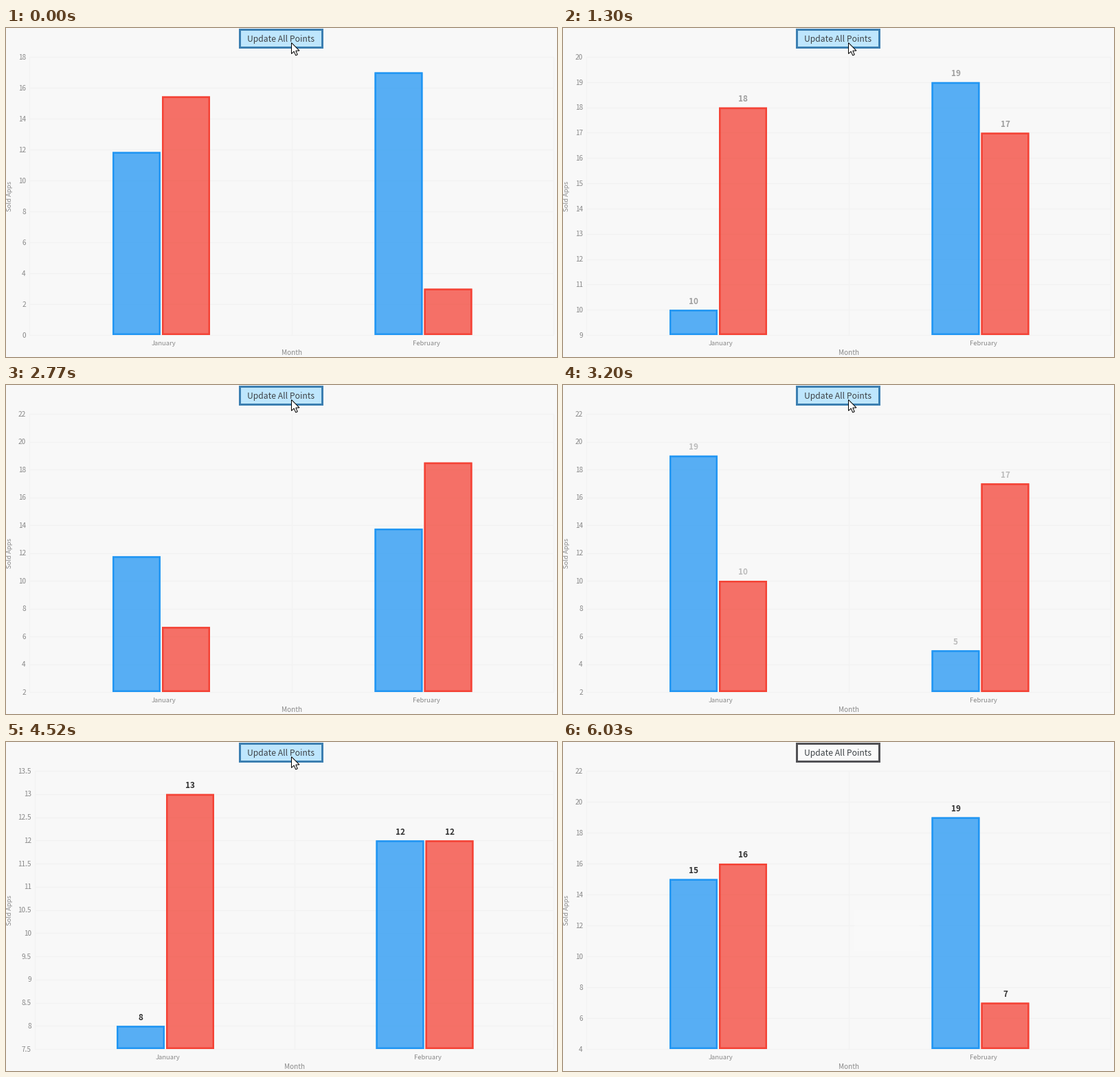
These frames come from a looping animation (802 px wide and 479 px high, 6250 ms). A matplotlib script:

```python
import numpy as np
import matplotlib.pyplot as plt
from matplotlib.animation import FuncAnimation
from matplotlib.collections import LineCollection
from matplotlib.patches import Polygon, Rectangle

W, H, DPI = 802, 479, 64
LOOP, STEP = 6250, 25
PX = 72 / DPI                      # points per pixel
TOP, BASE, RIGHT = 42, 447, 797
BAR_W, GAP = 70, 72
BLUE, RED = "#2196f3", "#f44336"

GROW = 300                         # bar animation, linear
FADE_DELAY, FADE = 450, 400        # value labels
LAG = 16                           # axis changes just before the bars move

# time of update, axis low, high, step, plot left, values (Jan, Feb pairs)
STATES = [
    (-271, 0, 18, 2, 34, (12, 16, 17, 3)),
    (670, 9, 20, 1, 34, (10, 18, 19, 17)),
    (1614, 2, 18, 2, 34, (6, 4, 16, 16)),
    (2630, 2, 22, 2, 34, (19, 10, 5, 17)),
    (3650, 7.5, 13.5, 0.5, 42, (8, 13, 12, 12)),
    (4640, 4, 22, 2, 34, (15, 16, 19, 7)),
]
FIRST_TOPS = np.array([212, 212, 64.5, 379.5])

HOVER_END = 4920
BUTTON = {
    "hover": ("#bee6fd", "#3c7fb1"),
    "pressed": ("#c4e5f6", "#2c628b"),
    "normal": ("#fafafa", "#515155"),
}

plt.rcParams["font.family"] = ["Noto Sans CJK JP", "DejaVu Sans"]
fig = plt.figure(figsize=(W / DPI, H / DPI), dpi=DPI, facecolor="#f8f8f8")
ax = fig.add_axes([0, 0, 1, 1])
ax.set_xlim(0, W)
ax.set_ylim(H, 0)
ax.axis("off")


def text(x, y, s="", size=10, color="#8a8a8a", **kw):
    kw = {"ha": "center", "va": "baseline", **kw}
    return ax.text(x, y, s, fontsize=size * PX, color=color, **kw)


def box(x, y, w, h, **kw):
    return ax.add_patch(Rectangle((x, y), w, h, snap=False, **kw))


def tops(state):
    _, lo, hi, _, _, values = state
    return BASE - (BASE - TOP) * (np.array(values) - lo) / (hi - lo)


grid = ax.add_collection(
    LineCollection([], colors="#f2f2f2", linewidths=1.2 * PX, zorder=1))
ticks = [text(0, 0, ha="right") for _ in range(13)]
months = [text(0, 462.3, name, 9.5) for name in ("January", "February")]
x_title = text(0, 476, "Month")
text(6, 245, "Sold Apps", 9.5, va="center", rotation=90)

EDGE = 2.5
fills, edges, labels = [], [], []
for color in (BLUE, RED, BLUE, RED):
    fills.append(box(0, 0, BAR_W, 0, fc=color, alpha=0.75, lw=0, zorder=2))
    edges.append(box(0, 0, BAR_W - EDGE, 0, fc="none", ec=color,
                     lw=EDGE * PX, joinstyle="miter", zorder=3))
    labels.append(text(0, 0, "", 11.8, "#303030", weight="bold"))

tip = box(424, 244, 95, 61, fc="white", lw=0, zorder=4)
button = box(340.5, 2.5, 120, 26, lw=3 * PX, joinstyle="miter", zorder=5)
text(400.5, 20, "Update All Points", 12.2, "#3f4448", zorder=6)

ARROW = np.array([(0, 0), (0, 16), (3.7, 12.6), (6.2, 18.4), (8.8, 17.3),
                  (6.3, 11.7), (11.5, 11.5)])
cursor = ax.add_patch(Polygon(ARROW, fc="white", ec="black", lw=PX,
                              joinstyle="miter", zorder=9))


def draw_axis(state):
    _, lo, hi, step, left, _ = state
    n = round((hi - lo) / step)
    ys = [BASE - (BASE - TOP) * k / n for k in range(n + 1)]
    mid = (left + RIGHT) / 2
    grid.set_segments([[(left, y), (RIGHT, y)] for y in ys]
                      + [[(x, TOP), (x, BASE)] for x in (left, mid, RIGHT)])
    for k, tick in enumerate(ticks):
        tick.set_visible(k <= n)
        if k <= n:
            tick.set_text(f"{lo + k * step:g}")
            tick.set_position((left - 5.2, ys[k] + 3.7))
    centers = [left + (RIGHT - left) * f for f in (0.25, 0.75)]
    for month, c in zip(months, centers):
        month.set_x(c + 5.25)
    x_title.set_x(mid)
    return [c - 69.75 + d for c in centers for d in (0, GAP)]


def draw_bars(xs, ys, values, alpha):
    for x, y, v, fill, edge, label in zip(xs, ys, values, fills, edges, labels):
        fill.set_xy((x, y))
        fill.set_height(BASE - y)
        edge.set_xy((x + EDGE / 2, y + EDGE / 2))
        edge.set_height(BASE - y - EDGE)
        label.set_text(str(v))
        label.set_position((x + BAR_W / 2, y - 8.6))
        label.set_alpha(alpha)
        label.set_visible(alpha > 0)


def draw_pointer(t):
    pressed = any(s[0] - 290 <= t < s[0] - 190 for s in STATES[1:])
    mode = "normal" if t >= HOVER_END else "pressed" if pressed else "hover"
    fc, ec = BUTTON[mode]
    button.set_facecolor(fc)
    button.set_edgecolor(ec)

    times = (4880, 5065, 5180)
    x = np.interp(t, times, (415.5, 554.5, 600))
    y = np.interp(t, times, (21.5, 340.5, 428))
    cursor.set_xy(ARROW + (x, y))
    cursor.set_visible(t < 5190)
    tip.set_alpha(np.interp(t, (5190, 5300, 5610, 6030), (0, 0.9, 0.9, 0.25)))


def update(i):
    t = i * STEP + 15
    k = max(j for j, s in enumerate(STATES) if s[0] <= t)
    state = STATES[k]
    age = t - state[0] - LAG
    p = np.clip(age / GROW, 0, 1)
    start = tops(STATES[k - 1]) if k else FIRST_TOPS
    ys = start + (tops(state) - start) * p
    alpha = float(np.clip((age - FADE_DELAY) / FADE, 0, 1))
    draw_bars(draw_axis(state), ys, state[5], alpha)
    draw_pointer(t)
    return []


anim = FuncAnimation(fig, update, frames=LOOP // STEP, interval=STEP,
                     init_func=lambda: update(0), repeat=True, repeat_delay=0,
                     blit=False, cache_frame_data=False)
plt.show()
```
